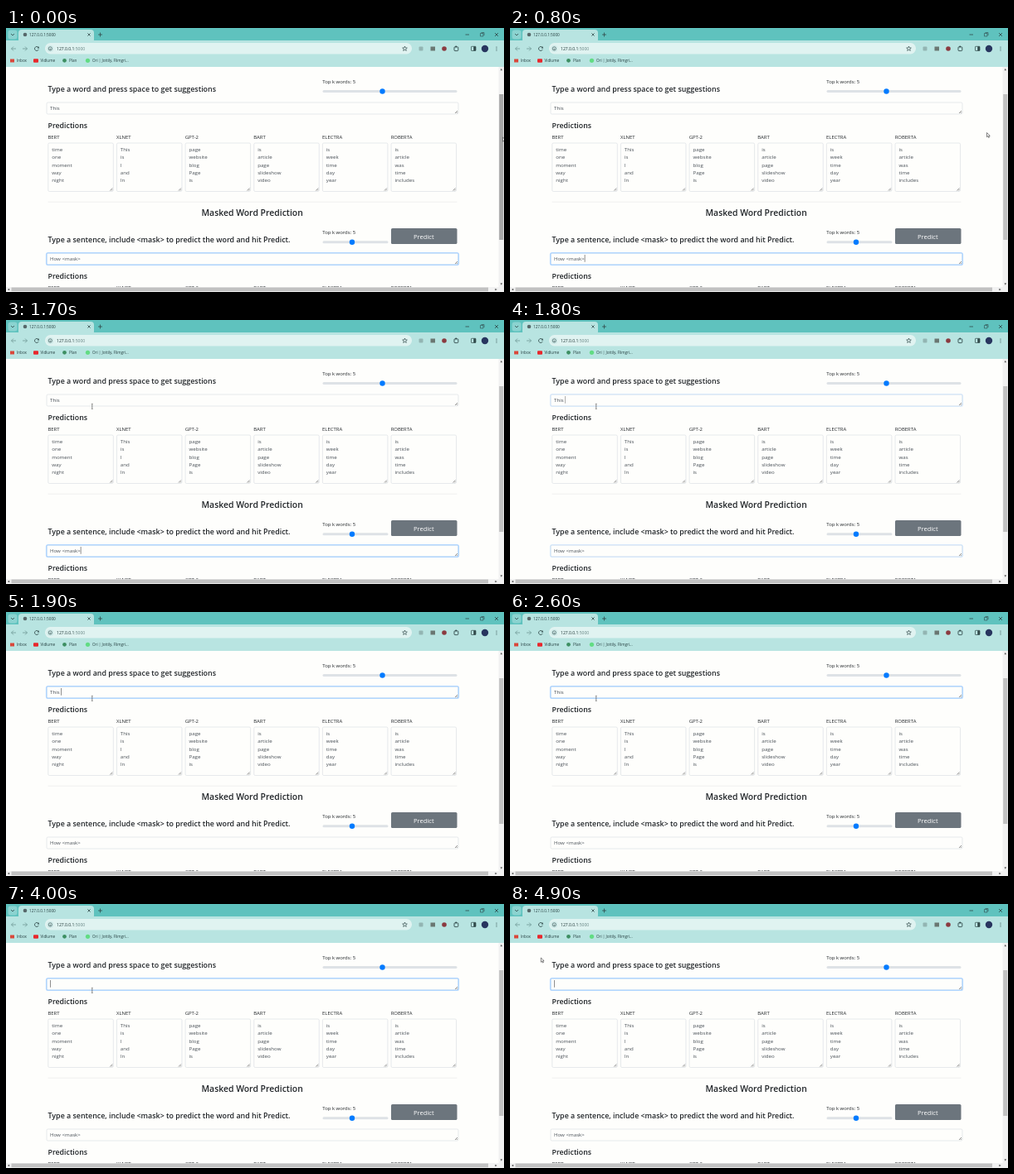
An HTML page with a canvas for the animation above (5 s loop, 600 px wide and 319 px high).

```html
<!DOCTYPE html>
<html lang="en">
<head>
<meta charset="utf-8">
<title>Word prediction</title>
<style>
  html, body { margin: 0; width: 100%; height: 100%; overflow: hidden; background: #fefefc; }
  canvas { display: block; }
</style>
</head>
<body>
<canvas id="stage" width="600" height="319"></canvas>
<script>
const c = document.getElementById('stage').getContext('2d');
const LOOP = 5000;
const INK = '#212529', FIELD = '#495057', DARK = '#30494a', FADED = '#6f9896';

const columns = {
  BERT: 'time one moment way night',
  XLNET: 'This is I and In',
  'GPT-2': 'page website blog Page is',
  BART: 'is article page slideshow video',
  ELECTRA: 'is week time day year',
  ROBERTA: 'is article was time includes'
};

// Each track is a list of [start ms, value].
const firstText = [[0, 'This'], [1800, 'This '], [2600, 'This'], [2700, 'Thi'], [2800, 'Th'], [3000, 'T'], [3100, '']];
const firstCaret = [[0, 0], [1800, 0.7], [1900, 1], [2300, 0], [2700, 1], [3300, 0], [3900, 1], [4400, 0], [4900, 1]];
const secondCaret = [[0, 0], [500, 1], [1200, 0], [1700, 1], [1800, 0]];
const firstFocus = [[0, 0], [1800, 0.35], [1900, 1]];
const secondFocus = [[0, 1], [1800, 0.4], [1900, 0]];
const at = (track, t) => track.filter(([start]) => start <= t).pop()[1];

function text(str, x, y, size = 5.95, color = INK, weight = 400) {
  c.font = `${weight} ${size}px "Open Sans", "Noto Sans", sans-serif`;
  c.fillStyle = color;
  c.fillText(str, x, y);
  return c.measureText(str).width;
}

function rect(x, y, w, h, color, radius = 0) {
  c.fillStyle = color;
  c.beginPath();
  c.roundRect(x, y, w, h, radius);
  c.fill();
}

function frame(x, y, w, h, color, radius = 0, width = 0.6) {
  c.strokeStyle = color;
  c.lineWidth = width;
  c.beginPath();
  c.roundRect(x, y, w, h, radius);
  c.stroke();
}

function dot(x, y, r, color) {
  c.fillStyle = color;
  c.beginPath();
  c.arc(x, y, r, 0, 7);
  c.fill();
}

function line(color, width, ...points) {
  c.strokeStyle = color;
  c.lineWidth = width;
  c.beginPath();
  for (let i = 0; i < points.length; i += 2) c.lineTo(points[i], points[i + 1]);
  c.stroke();
}

function cross(x, y, r) {
  line(DARK, 0.8, x - r, y - r, x + r, y + r);
  line(DARK, 0.8, x - r, y + r, x + r, y - r);
}

function triangle(x, y, dx, dy, color = '#555') {
  c.fillStyle = color;
  c.beginPath();
  c.moveTo(x + dx, y + dy);
  c.lineTo(x - dx + dy, y - dy + dx);
  c.lineTo(x - dx - dy, y - dy - dx);
  c.fill();
}

function box(x, y, w, h) {
  frame(x, y, w, h, '#ced4da', 1.5, 0.5);
  line('#666', 0.7, x + w - 4, y + h - 1, x + w - 1, y + h - 4);
  line('#666', 0.7, x + w - 2.2, y + h - 1, x + w - 1, y + h - 2.2);
}

function input(y, value, focus, caret) {
  box(49, y, 496, 14);
  c.globalAlpha = focus;
  frame(48.5, y - 0.5, 497, 15, '#c6e1ff', 2, 1.2);
  frame(49, y, 496, 14, '#80bdff', 1.5, 0.6);
  c.globalAlpha = 1;
  const w = text(value, 53, y + 9.2, 6.15, FIELD);
  c.globalAlpha = caret;
  rect(53 + w, y + 2, 0.6, 8.8, '#444');
  c.globalAlpha = 1;
}

function slider(y, w, thumb) {
  text('Top k words: 5', 381.3, y - 9.9);
  rect(381.5, y - 1.5, w, 3, '#dee2e6', 1.5);
  dot(thumb, y, 3.2, '#007bff');
}

function star(x, y) {
  c.strokeStyle = DARK;
  c.lineWidth = 0.7;
  c.beginPath();
  for (let i = 0; i < 10; i++) {
    const r = i % 2 ? 1.3 : 3, a = i * Math.PI / 5 - Math.PI / 2;
    c.lineTo(x + r * Math.cos(a), y + r * Math.sin(a));
  }
  c.closePath();
  c.stroke();
}

function browser() {
  rect(0, 0, 600, 16, '#5fc2be');
  rect(2.5, 2.5, 11, 11, '#8bd3d0', 3);
  line(DARK, 0.8, 6, 7, 8, 9, 10, 7);
  rect(15, 2, 91, 16, '#b8e4e1', 4);
  rect(0, 15, 600, 32, '#b8e4e1');
  dot(23, 8, 2.3, '#57686a');
  text('127.0.0.1:5000', 28, 9.8, 4.7, '#263f40');
  cross(100, 8, 1.6);
  line(DARK, 0.8, 111, 8, 116, 8);
  line(DARK, 0.8, 113.5, 5.5, 113.5, 10.5);
  line(DARK, 0.8, 553.5, 8, 558, 8);
  frame(571.5, 6.5, 3.5, 3.5, DARK);
  line(DARK, 0.6, 572.5, 5.5, 576, 5.5, 576, 9);
  cross(591, 8, 2);

  line(FADED, 0.8, 12, 25, 6.5, 25);
  line(FADED, 0.8, 9, 22.5, 6.5, 25, 9, 27.5);
  line(FADED, 0.8, 20, 25, 25.5, 25);
  line(FADED, 0.8, 23, 22.5, 25.5, 25, 23, 27.5);
  c.strokeStyle = DARK;
  c.lineWidth = 0.8;
  c.beginPath();
  c.arc(37, 25, 2.5, 0.4, 5.5);
  c.stroke();
  triangle(39, 23.3, 0, -1.2, DARK);

  rect(47, 18, 442, 13.5, '#e0f3f1', 6.5);
  dot(53.3, 24.9, 4, '#cfeae8');
  frame(51.2, 22.8, 4.2, 4.2, DARK, 2.1);
  line(DARK, 0.7, 53.3, 24.8, 53.3, 26.3);
  const w = text('127.0.0.1', 61, 26.9, 5.05, '#1d3535');
  text(':5000', 61 + w, 26.9, 5.05, '#678584');
  star(480.5, 25);

  rect(497.5, 22.5, 5, 5, '#93b5b3', 1);
  rect(511.5, 22.5, 5.5, 5, '#6a7772');
  dot(528, 25, 2.8, '#8b3a40');
  frame(540, 22.8, 4.8, 4.8, DARK, 1, 0.9);
  dot(542.2, 22.5, 1, DARK);
  frame(560.5, 22.3, 5.5, 5.2, DARK, 0.5, 0.7);
  rect(563.3, 22.3, 2.7, 5.2, DARK);
  dot(577, 25, 4.2, '#28355f');
  for (const y of [23, 25, 27]) dot(591, y, 0.6, DARK);

  rect(5, 37.5, 5, 4, '#d9483b');
  rect(33, 37.2, 6, 4.5, '#e8272c', 1);
  dot(70.5, 39.3, 2.4, '#3d8f62');
  dot(98.5, 39.3, 2.6, '#62dc83');
  const bookmarks = { Inbox: 13, Vidlume: 41.5, Plan: 76, 'Ori | Jottily, Flimgri...': 104 };
  for (const [name, x] of Object.entries(bookmarks)) text(name, x, 41.1, 4.6, '#263f40');
}

function scrollbars(t) {
  rect(593.5, 47, 6.5, 266, '#f1f1f1');
  rect(594.2, 80, 5.1, 176, t < 800 ? '#a8a8a8' : '#c1c1c1');
  triangle(596.8, 50, 0, -1.2);
  triangle(596.8, 309.5, 0, 1.2);
  rect(0, 313, 600, 6, '#f1f1f1');
  rect(6.5, 313.5, 574.5, 4.8, '#c1c1c1');
  triangle(3, 316, -1.2, 0);
  triangle(590.5, 316, 1.2, 0);
}

function page(t) {
  rect(0, 47, 600, 272, '#fefefc');
  text('Type a word and press space to get suggestions', 50.5, 76.8, 8.9, INK, 600);
  slider(76.5, 162, 453.5);
  input(90, at(firstText, t), at(firstFocus, t), at(firstCaret, t));
  text('Predictions', 50.5, 121.2, 8.8, INK, 600);
  text('Predictions', 50.5, 303.3, 8.8, INK, 600);

  Object.entries(columns).forEach(([name, words], i) => {
    const x = 50.8 + i * 82.65;
    text(name, x - 0.4, 134);
    text(name, x - 0.4, 316.4);
    box(x, 139, 78.5, 58.5);
    words.split(' ').forEach((word, row) => text(word, x + 4.4, 148.6 + row * 9.45, 6.15, FIELD));
  });

  rect(50.5, 209.8, 493, 0.6, '#ebecec');
  text('Masked Word Prediction', 235.5, 227.4, 10.42, INK, 600);
  text('Type a sentence, include <mask> to predict the word and hit Predict.', 50.5, 259.2, 8.9, INK, 600);
  slider(258.8, 79, 417);
  rect(464, 242, 79.5, 19, '#6c757d', 1.6);
  text('Predict', 491, 254.5, 7.6, '#fff');
  input(272, 'How <mask>', at(secondFocus, t), at(secondCaret, t));
}

function arrow(x, y) {
  c.beginPath();
  for (const [dx, dy] of [[0, 0], [0, 5.2], [1.3, 4.1], [2.1, 6], [3, 5.6], [2.2, 3.8], [3.8, 3.7]]) c.lineTo(x + dx, y + dy);
  c.closePath();
  c.fillStyle = '#fff';
  c.fill();
  c.strokeStyle = '#333';
  c.lineWidth = 0.6;
  c.stroke();
}

function pointer(t) {
  if (t < 800) return arrow(598.5, 132);
  if (t < 900) return arrow(574.5, 126.5);
  if (t >= 4900) return arrow(37.3, 65);
  if (t < 1700) {
    const p = Math.max(0, (t - 1100) / 600), k = p * p * (3 - 2 * p);
    return arrow(555 - 451 * k, 124 - 20 * k);
  }
  line('#555', 0.7, 103.8, 101.5, 103.8, 107.3);
  line('#555', 0.5, 102.8, 101.3, 104.8, 101.3);
  line('#555', 0.5, 102.8, 107.5, 104.8, 107.5);
}

function draw(now) {
  const t = Math.floor(now % LOOP / 100) * 100;
  browser();
  page(t);
  scrollbars(t);
  pointer(t);
  requestAnimationFrame(draw);
}
draw(0);
</script>
</body>
</html>
```
